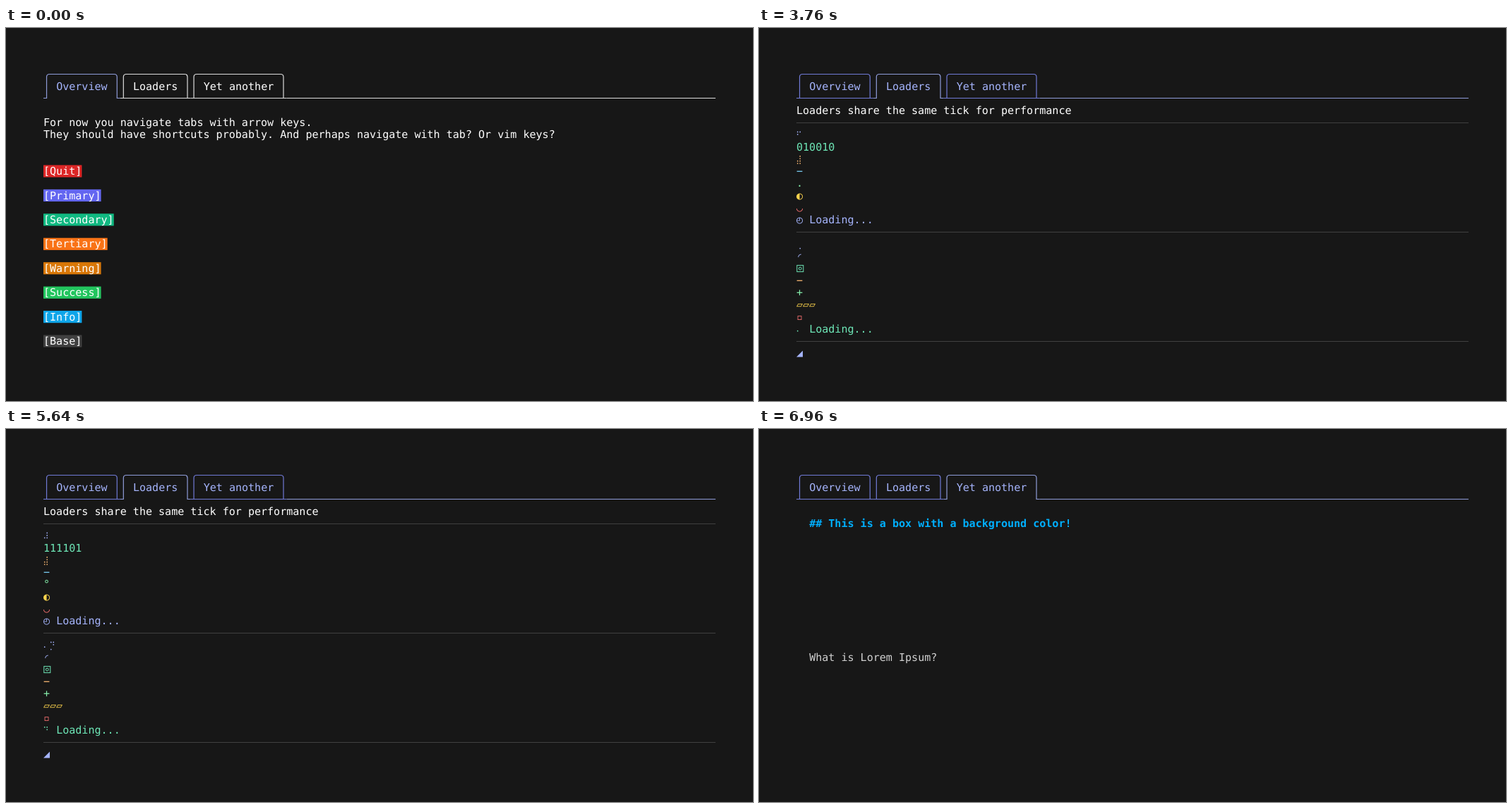
Animation, 1058 px wide and 529 px high, one loop 8000 ms. Source, as an HTML page:

```html
<!DOCTYPE html>
<html lang="en">
<head>
<meta charset="utf-8">
<title>Terminal tabs</title>
<style>
  html, body { margin: 0; width: 100%; height: 100%; overflow: hidden; background: #171717; }
  svg { display: block; width: 100vw; height: 100vh; }
  text {
    font: 15.06px "DejaVu Sans Mono", "Liberation Mono", monospace;
    text-rendering: geometricPrecision;
    white-space: pre;
  }
  path { fill: none; }
  .line { stroke-width: 1.2; stroke-opacity: .85; }
  .dots { stroke-width: 1.7; stroke-linecap: round; }
</style>
</head>
<body>
<svg id="stage" viewBox="0 0 1058 529"></svg>
<script>
const LOOP = 8000, LEFT = 53, TOP = 56.7, CW = 9.066, RH = 17.215, COLS = 105;
const WHITE = '#fff', DARK = '#171717', RULE = '#484848';
const INDIGO = '#a5b4fc', INDIGO_DEEP = '#818cf8', EMERALD = '#6ee7b7', ORANGE = '#fdba74',
      SKY = '#7dd3fc', GREEN = '#86efac', AMBER = '#fcd34d', RED = '#f87171';

const colX = c => LEFT + c * CW;
const rowY = r => TOP + r * RH;
const midY = r => Math.floor(rowY(r + .5)) + .5;

function add(parent, tag, attrs = {}) {
  const el = document.createElementNS('http://www.w3.org/2000/svg', tag);
  for (const key in attrs) el.setAttribute(key, attrs[key]);
  return parent.appendChild(el);
}
function print(parent, row, col, str, fill, extra) {
  const el = add(parent, 'text', { x: colX(col), y: rowY(row) + 13.7, fill, ...extra });
  el.textContent = str;
  return el;
}
const line = (parent, d, stroke) => add(parent, 'path', { d, stroke, class: 'line' });

const stage = document.getElementById('stage');
const pages = [0, 1, 2].map(() => add(stage, 'g'));

// Tab bar
const tabs = [['Overview', 0, 11], ['Loaders', 12, 22], ['Yet another', 23, 37]].map(([name, from, to]) => ({
  from, to,
  border: line(stage, '', WHITE),
  label: print(stage, 1, from + 2, name, WHITE)
}));
const baseY = midY(2);
const rest = line(stage, `M${colX(38)} ${baseY}H${colX(COLS)}`, WHITE);

function tabPath({ from, to }, active) {
  const x1 = colX(from + .5), x2 = colX(to + .5), y = midY(0), r = 4;
  const box = `M${colX(from)} ${baseY}H${x1}V${y + r}q0 ${-r} ${r} ${-r}` +
              `H${x2 - r}q${r} 0 ${r} ${r}V${baseY}H${colX(to + 1)}`;
  return active ? box : box + `M${x1} ${baseY}H${x2}`;
}
function drawTabs(current, focused) {
  tabs.forEach((tab, i) => {
    const active = i === current;
    tab.border.setAttribute('d', tabPath(tab, active));
    tab.border.setAttribute('stroke', active ? INDIGO : focused ? INDIGO_DEEP : WHITE);
    tab.label.setAttribute('fill', active || focused ? INDIGO : WHITE);
  });
  rest.setAttribute('stroke', focused ? INDIGO : WHITE);
}

// Overview page
print(pages[0], 4, 0, 'For now you navigate tabs with arrow keys.', WHITE);
print(pages[0], 5, 0, 'They should have shortcuts probably. And perhaps navigate with tab? Or vim keys?', WHITE);
const buttons = [
  ['Quit', '#dc2626'], ['Primary', '#6366f1'], ['Secondary', '#10b981'], ['Tertiary', '#f97316'],
  ['Warning', '#d97706'], ['Success', '#22c55e'], ['Info', '#0ea5e9'], ['Base', '#404040']
].map(([name, fill], i) => {
  const row = 8 + i * 2;
  return {
    box: add(pages[0], 'rect', { x: LEFT, y: rowY(row), width: (name.length + 2) * CW, height: RH, fill }),
    label: print(pages[0], row, 0, `[${name}]`, WHITE)
  };
});
function drawQuit(focused) {
  const { box, label } = buttons[0];
  box.setAttribute('fill', focused ? '#ef4444' : '#dc2626');
  label.setAttribute('fill', focused ? DARK : WHITE);
  label.textContent = focused ? '(Quit)' : '[Quit]';
}

// Loaders page
print(pages[1], 3, 0, 'Loaders share the same tick for performance', WHITE);
for (const row of [4, 13, 22]) line(pages[1], `M${LEFT} ${midY(row)}H${colX(COLS)}`, RULE);
print(pages[1], 12, 2, 'Loading...', INDIGO);
print(pages[1], 21, 2, 'Loading...', EMERALD);

const DOT_SPOTS = [[0, 0], [0, 1], [0, 2], [1, 0], [1, 1], [1, 2], [0, 3], [1, 3]];
function braillePath(str, row) {
  let d = '';
  [...str].forEach((ch, col) => DOT_SPOTS.forEach(([dx, dy], bit) => {
    if (ch.codePointAt(0) >> bit & 1)
      d += `M${(colX(col) + 1.7 + dx * 3.5).toFixed(2)} ${(rowY(row) + 4.7 + dy * 3.4).toFixed(2)}h.01`;
  }));
  return d;
}
function glyphLoader(row, color, frames) {
  const el = print(pages[1], row, 0, '', color);
  return n => { el.textContent = frames[n % frames.length]; };
}
function brailleLoader(row, color, frames) {
  const el = add(pages[1], 'path', { stroke: color, class: 'dots' });
  return n => el.setAttribute('d', braillePath(frames[n % frames.length], row));
}
function boxLoader(row, color) {
  const x = 58.3, y = rowY(row + .5) + .4;
  const g = add(pages[1], 'g', { stroke: color, fill: 'none', 'stroke-width': 1 });
  add(g, 'rect', { x: x - 4.5, y: y - 4.5, width: 9, height: 9 });
  const ring = add(g, 'circle', { cx: x, cy: y, r: 1.9 });
  const star = add(g, 'path', { d: `M${x} ${y - 2.6}v5.2M${x - 2.3} ${y - 1.3}l4.6 2.6m0 -2.6l-4.6 2.6` });
  return n => {
    const starred = Math.floor(n / 3) % 2 === 1;
    ring.style.display = starred ? 'none' : '';
    star.style.display = starred ? '' : 'none';
  };
}

const SPIN = ['−', '\\', '|', '/'];
const ORBIT = ('⢀⠀ ⡀⠀ ⠄⠀ ⢂⠀ ⡂⠀ ⠅⠀ ⢃⠀ ⡃⠀ ⠍⠀ ⢋⠀ ⡋⠀ ⠍⠁ ⢋⠁ ⡋⠁ ⠍⠉ ⠋⠉ ⠋⠉ ⠉⠙ ⠉⠙ ⠉⠩ ⠈⢙ ⠈⡙ ⢈⠩ ⡀⢙ ⠄⡙ ⢂⠩ ⡂⢘ ⠅⡘ ' +
  '⢃⠨ ⡃⢐ ⠍⡐ ⢋⠠ ⡋⢀ ⠍⡁ ⢋⠁ ⡋⠁ ⠍⠉ ⠋⠉ ⠋⠉ ⠉⠙ ⠉⠙ ⠉⠩ ⠈⢙ ⠈⡙ ⠈⠩ ⠀⢙ ⠀⡙ ⠀⠩ ⠀⢘ ⠀⡘ ⠀⠨ ⠀⢐ ⠀⡐ ⠀⠠ ⠀⢀ ⠀⡀').split(' ');
const BITS = '010010 001100 100101 111010 111101 010111 101011 111000 110011 110101'.split(' ');
const METER = [0, 1, 2, 3, 2, 1].map(k => '▰'.repeat(k) + '▱'.repeat(3 - k));

const loaders = [
  brailleLoader(5, INDIGO, [...'⠋⠙⠹⠸⠼⠴⠦⠧⠇⠏']),
  glyphLoader(6, EMERALD, BITS),
  brailleLoader(7, ORANGE, [...'⣼⣹⢻⠿⡟⣏⣧⣶']),
  glyphLoader(8, SKY, SPIN),
  glyphLoader(9, GREEN, [...'.oO°Oo.']),
  glyphLoader(10, AMBER, [...'◐◓◑◒']),
  glyphLoader(11, RED, [...'◡⊙◠']),
  glyphLoader(12, INDIGO, [...'◴◷◶◵']),
  brailleLoader(14, INDIGO, ORBIT),
  glyphLoader(15, INDIGO, [...'◜◠◝◞◡◟']),
  boxLoader(16, EMERALD),
  glyphLoader(17, ORANGE, SPIN),
  glyphLoader(18, GREEN, [...'+x*']),
  glyphLoader(19, AMBER, METER),
  glyphLoader(20, RED, ['▫']),
  brailleLoader(21, EMERALD, [...'⠄⠆⠇⠋⠙⠸⠰⠠⠰⠸⠙⠋⠇⠆']),
  glyphLoader(23, INDIGO, [...'◢◣◤◥'])
];

// Third page
print(pages[2], 4, 2, '## This is a box with a background color!', '#00afff', { 'font-weight': 700, style: 'font-weight:700' });
print(pages[2], 15, 2, 'What is Lorem Ipsum?', '#d0d0d0');

// The second tick is a short one; the rest are 80 ms apart.
const tickAt = t => t < 3840 ? 0 : t < 3880 ? 1 : 2 + Math.floor((t - 3880) / 80);

function render(t) {
  const current = t < 3760 ? 0 : t < 6960 ? 1 : 2;
  const onQuit = t >= 2960 && t < 3360;
  pages.forEach((page, i) => { page.style.display = i === current ? '' : 'none'; });
  drawTabs(current, t >= 720 && !onQuit);
  drawQuit(onQuit);
  if (current === 1) loaders.forEach(draw => draw(tickAt(t)));
}

const start = performance.now();
function loop() {
  render((performance.now() - start) % LOOP);
  requestAnimationFrame(loop);
}
loop();
</script>
</body>
</html>
```
